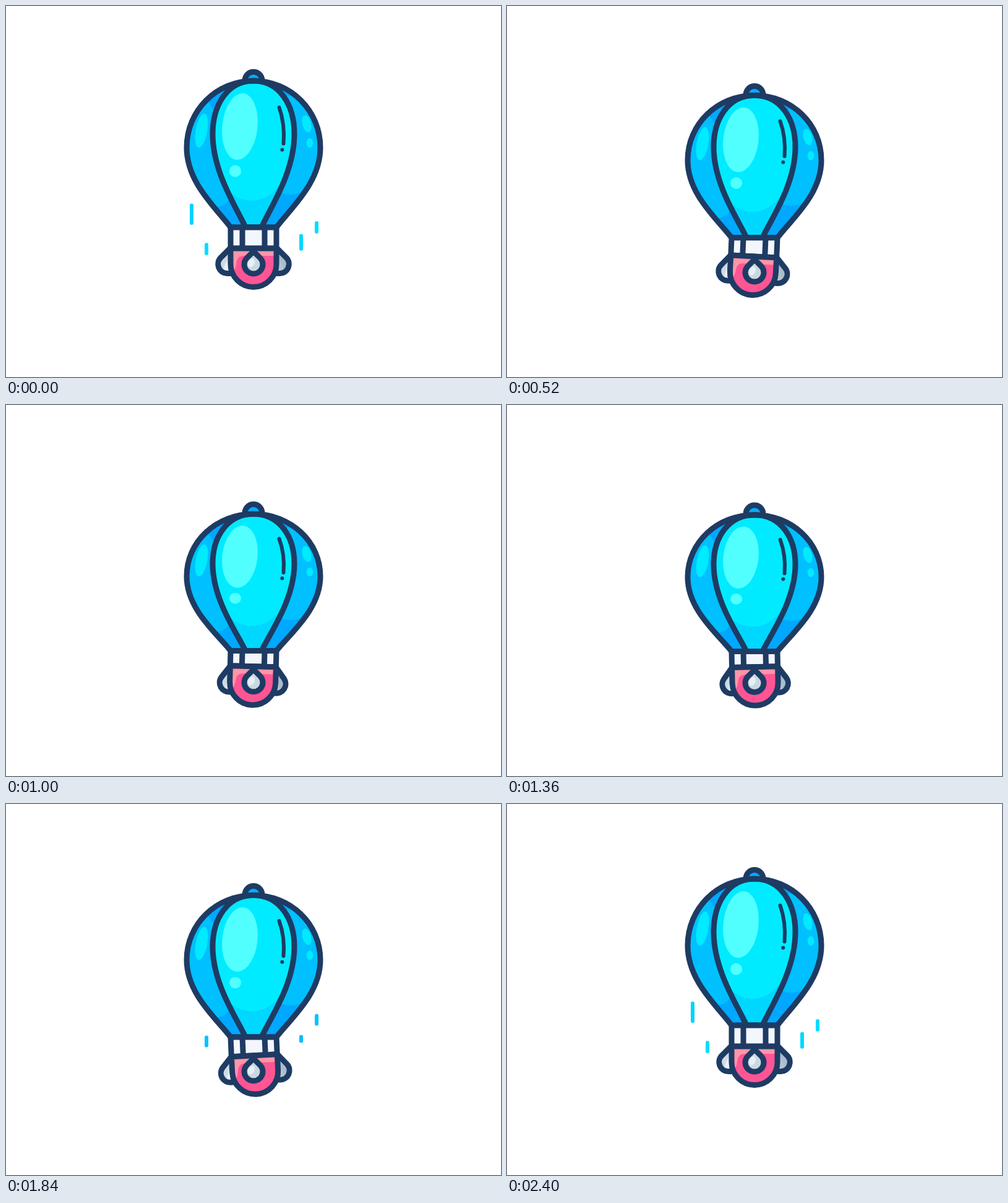
Write an HTML page with a canvas that moves like this. It is 800 px wide and 600 px high and loops after 2.44 s.

```html
<!DOCTYPE html>
<html lang="en">
<head>
<meta charset="utf-8">
<title>Hot air balloon</title>
<style>
  html, body { margin: 0; width: 100%; height: 100%; overflow: hidden; background: #fff; }
  canvas { display: block; }
</style>
</head>
<body>
<canvas id="stage" width="800" height="600"></canvas>
<script>
const ctx = document.getElementById('stage').getContext('2d');
const LOOP = 2440, CYCLE = 2400, STEP = 40;
const INK = '#1e3b63', STROKE = 9;
const RAD = Math.PI / 180;

// Envelope shapes at the top of the flight
const outline = new Path2D(
  'M363 358C338 325 292 285 292 229C292 169 340 121 400 121' +
  'C460 121 508 169 508 229C508 285 462 325 437 358Z');
const centre = new Path2D(
  'M387 358C374 328 334 270 334 207C334 160 358 121 400 121' +
  'C442 121 466 160 466 207C466 270 426 328 413 358Z');
const glint = new Path2D('M441.5 164Q451 191 448.5 222.5');

const basket = new Path2D('M363 392H437V417.5A37 37 0 0 1 363 417.5Z');
const basketShade = new Path2D(
  'M445 404H384Q374 404 372.5 414Q371 428 364 434V465H445Z');
const sandbag = new Path2D(
  'M374 380L347 407A15 15 0 0 0 357.5 432.5H374Z');
const drop = new Path2D(
  'M0 -21L10.6 -10.6A15 15 0 1 1 -10.6 -10.6Z');

// Speed lines: x, upper end, start time
const streaks = [
  [300, 319, 1840], [324, 355, 1610], [477, 354, 1720], [502, 320, 1610]
];

function transformed(path, matrix) {
  const result = new Path2D();
  result.addPath(path, matrix);
  return result;
}

function fill(path, color) {
  ctx.fillStyle = color;
  ctx.fill(path);
}

function stroke(path, width = STROKE) {
  ctx.strokeStyle = INK;
  ctx.lineWidth = width;
  ctx.stroke(path);
}

function ellipse(x, y, rx, ry, tilt, color) {
  ctx.fillStyle = color;
  ctx.beginPath();
  ctx.ellipse(x, y, rx, ry, tilt * RAD, 0, Math.PI * 2);
  ctx.fill();
}

// Runs paint inside the clip, with its coordinates under the matrix
function inside(clip, matrix, paint) {
  ctx.save();
  ctx.clip(clip);
  ctx.transform(matrix.a, matrix.b, matrix.c, matrix.d, matrix.e, matrix.f);
  paint();
  ctx.restore();
}

function drawStreaks(t, sink) {
  for (const [x, top, start] of streaks) {
    const age = (t - start + CYCLE) % CYCLE;
    if (age >= 940) continue;
    const head = top + 0.057 * age;
    const tail = top + 0.119 * Math.max(0, age - 530);
    ctx.globalAlpha = Math.min(1, age / 110, (940 - age) / 150);
    ctx.strokeStyle = `rgb(0, ${Math.round(185 + age * 0.045)}, 255)`;
    ctx.lineWidth = Math.min(6, 2 + age * 0.04);
    ctx.beginPath();
    ctx.moveTo(x, tail + 50 * sink);
    ctx.lineTo(x, Math.max(head, tail + 0.1) + 50 * sink);
    ctx.stroke();
  }
  ctx.globalAlpha = 1;
}

function drawSandbag(side, sink, body) {
  const m = body.translate(400, 0).scale(side, 1).translate(-400, 0)
    .translate(372, 392).rotate(-9 * sink).translate(-372, -392);
  const path = transformed(sandbag, m);
  const left = side > 0;
  fill(path, left ? '#cddbe4' : '#a9bdcb');
  inside(path, m, () =>
    ellipse(364, 418, 9, 22, 28, left ? '#e8f1f6' : '#b5c6d2'));
  stroke(path);
}

function drawKnob(sink) {
  const knob = new Path2D();
  knob.arc(400, 120.5 + 58 * sink, 14, Math.PI, 0);
  fill(knob, '#00aeff');
  stroke(knob);
}

function drawEnvelope(sink) {
  // Top and bottom travel different distances, which squashes the shape
  const top = 121 + 59.2 * sink, bottom = 358 + 42.4 * sink;
  const squash = (bottom - top) / 237;
  const m = new DOMMatrix([1, 0, 0, squash, 0, top - 121 * squash]);
  const shell = transformed(outline, m);
  const panel = transformed(centre, m);

  fill(shell, '#00a8ff');
  inside(shell, m, () => {
    ellipse(312, 225, 46, 105, -20, '#00c0ff');
    ellipse(460, 225, 55, 80, 0, '#00c0ff');
    ellipse(316, 201.5, 9.3, 28, 10, '#00ebff');
    ellipse(486, 190.5, 7, 14, -14, '#00ebff');
    ellipse(491, 221.5, 5.3, 7.8, 0, '#00ebff');
  });

  fill(panel, '#00d7ff');
  inside(panel, m, () => {
    ellipse(397, 215, 68, 100, 0, '#00ebff');
    ellipse(378, 195, 28.5, 54, 6, '#52ffff');
    ellipse(370.5, 267, 9.5, 9.5, 0, '#52ffff');
  });

  stroke(transformed(glint, m), 6);
  const dot = m.transformPoint(new DOMPoint(446.3, 232.5));
  ellipse(dot.x, dot.y, 3, 3, 0, INK);
  stroke(panel);
  stroke(shell);
}

function drawCollar(sink, body) {
  const top = 358 + 42.4 * sink;
  const foot = x => body.transformPoint(new DOMPoint(x, 392));
  const left = foot(363), right = foot(437);

  const band = new Path2D();
  band.moveTo(363, top);
  band.lineTo(437, top);
  band.lineTo(right.x, right.y);
  band.lineTo(left.x, left.y);
  band.closePath();
  fill(band, '#f3f6fd');

  for (const x of [382, 418]) {
    const end = foot(x);
    band.moveTo(x, top);
    band.lineTo(end.x, end.y);
  }
  stroke(band);
}

function drawBasket(sink, body) {
  const path = transformed(basket, body);
  fill(path, '#ff95a8');
  inside(path, body, () => fill(basketShade, '#ff5595'));
  stroke(path);

  const m = new DOMMatrix().translate(400, 418 + 33 * sink);
  const weight = transformed(drop, m);
  fill(weight, '#c9d8e2');
  inside(weight, m, () => ellipse(-3.5, -2.5, 5, 7.5, 25, '#e6f0f5'));
  stroke(weight);
}

function draw(t) {
  const phase = t / CYCLE * Math.PI * 2;
  const sink = (1 - Math.cos(phase)) / 2;
  const sway = 3.1 * Math.sin(phase);
  const body = new DOMMatrix().translate(400, 368 + 33 * sink)
    .rotate(sway).translate(-400, -368);

  ctx.fillStyle = '#fff';
  ctx.fillRect(0, 0, 800, 600);
  ctx.lineCap = ctx.lineJoin = 'round';

  drawStreaks(t, sink);
  drawSandbag(1, sink, body);
  drawSandbag(-1, sink, body);
  drawKnob(sink);
  drawEnvelope(sink);
  drawCollar(sink, body);
  drawBasket(sink, body);
}

const begin = performance.now();

function tick() {
  const t = (performance.now() - begin) % LOOP;
  draw(Math.floor(t / STEP) * STEP);
  requestAnimationFrame(tick);
}

tick();
</script>
</body>
</html>
```
